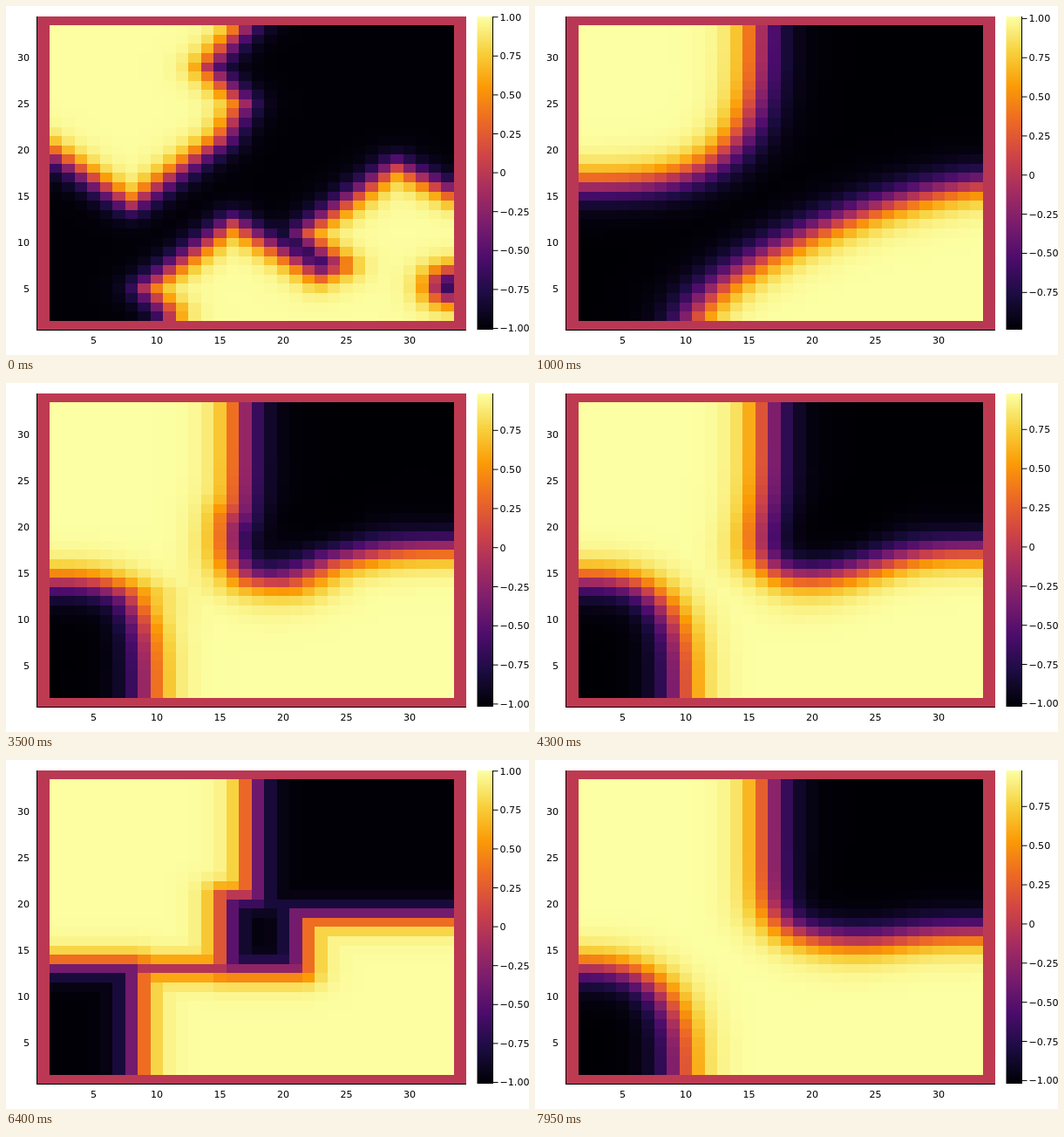
These frames come from a looping animation (600 by 400 pixels, 8000 ms). An HTML page with a canvas:

```html
<!DOCTYPE html>
<html lang="en">
<head>
<meta charset="utf-8">
<title>Phase field heatmap</title>
<style>
  html, body { margin: 0; width: 100%; height: 100%; overflow: hidden; background: #fff; }
  canvas, svg { position: absolute; left: 0; top: 0; width: 600px; height: 400px; }
  text { font: 11.1px "DejaVu Sans", sans-serif; fill: #000; }
  line { stroke: #000; stroke-width: 1; }
</style>
</head>
<body>
<canvas id="plot" width="600" height="400"></canvas>
<svg id="axes" viewBox="0 0 600 400"></svg>
<script>
const LOOP = 8000, STEP = 50, CELLS = 34;
const LEFT = 35.25, TOP = 11.6, CELL_W = 14.5, CELL_H = 10.58;
const LOW_EDGE = 1.5, HIGH_EDGE = 33.5;
const BAR = { x: 540.5, right: 558, top: 12, height: 359 };

const INFERNO = ['000004', '1b0c41', '4a0c6b', '781c6d', 'a52c60',
  'cf4446', 'ed6925', 'fb9b06', 'f7d13d', 'fcffa4']
  .map(h => [0, 2, 4].map(i => parseInt(h.slice(i, i + 2), 16)));

const mix = (a, b, p) => a + (b - a) * p;
const clamp = (v, a, b) => Math.max(a, Math.min(b, v));

function inferno(u) {
  const s = clamp(u, 0, 1) * (INFERNO.length - 1);
  const i = Math.min(Math.floor(s), INFERNO.length - 2);
  return `rgb(${INFERNO[i].map((c, k) => Math.round(mix(c, INFERNO[i + 1][k], s - i)))})`;
}

// Shapes are functions (x, y) => distance to the border, positive inside.
const union = (...shapes) => (x, y) => Math.max(...shapes.map(s => s(x, y)));
const outside = shape => (x, y) => -shape(x, y);

// Superellipse around a domain corner, optionally bulging towards one angle
function corner(cx, cy, a, b, power, bulge = 0, angle = 52, spread = 12) {
  const level = (x, y) => {
    const u = Math.abs(x - cx), v = Math.abs(y - cy);
    const turn = (Math.atan2(v, u) * 180 / Math.PI - angle) / spread;
    return ((u / a) ** power + (v / b) ** power) ** (1 / power) /
      (1 + bulge * Math.exp(-turn * turn));
  };
  const h = 0.01;
  return (x, y) => {
    const slope = Math.hypot(level(x + h, y) - level(x - h, y),
      level(x, y + h) - level(x, y - h)) / (2 * h);
    return (1 - level(x, y)) / slope;
  };
}
const topLeft = (...a) => corner(LOW_EDGE, HIGH_EDGE, ...a);
const topRight = (...a) => corner(HIGH_EDGE, HIGH_EDGE, ...a);
const bottomLeft = (...a) => corner(LOW_EDGE, LOW_EDGE, ...a);
const bottomRight = (...a) => corner(HIGH_EDGE, LOW_EDGE, ...a);

const disc = (cx, cy, r) => (x, y) => r - Math.hypot(x - cx, y - cy);

const box = (x0, y0, x1, y1) => (x, y) => {
  const dx = Math.max(x0 - x, x - x1), dy = Math.max(y0 - y, y - y1);
  return -Math.hypot(Math.max(dx, 0), Math.max(dy, 0)) - Math.min(Math.max(dx, dy), 0);
};

const polygon = (...points) => (x, y) => {
  let near = Infinity, odd = false;
  points.forEach(([ax, ay], i) => {
    const [bx, by] = points[(i + 1) % points.length];
    const dx = bx - ax, dy = by - ay;
    const t = clamp(((x - ax) * dx + (y - ay) * dy) / (dx * dx + dy * dy), 0, 1);
    near = Math.min(near, Math.hypot(x - ax - dx * t, y - ay - dy * t));
    if ((ay > y) !== (by > y) && x < ax + (y - ay) * dx / dy) odd = !odd;
  });
  return odd ? near : -near;
};

// Sample the bright phase on the grid, top row first
function state(shape, width, high, low) {
  const field = [];
  for (let y = CELLS - 1; y > 1; y--)
    for (let x = 2; x < CELLS; x++) field.push(shape(x, y));
  return { field, width, high, low };
}

const rough = shape => state(shape, 1.35, 1.004, -1.0085);
const darkBand = (...shapes) => state(union(...shapes), 1.95, 1.0134, -0.988);
const brightBand = (...shapes) => state(outside(union(...shapes)), 1.9, 0.98, -1.02);

const zigzagLeft = polygon([-20, 20.3], [1, 20.2], [8, 14.1], [15.2, 21.2],
  [16.8, 25], [14, 29], [18, 35], [18, 60], [-20, 60]);
const zigzagRight = polygon([11, -20], [11, 2.5], [9.1, 5], [16, 12.1], [22.8, 6.4],
  [24.6, 7.5], [21.6, 11], [28.9, 18.2], [33.5, 15.2], [60, 15.2], [60, -20]);
const hole = disc(33.4, 5.3, 1.5);
const zigzag = rough((x, y) => Math.min(union(zigzagLeft, zigzagRight)(x, y), -hole(x, y)));

const blocks = rough(outside(union(
  box(-20, -20, 8.5, 13.5),
  box(17.45, 18.5, 60, 60),
  box(15.3, 12.7, 21.5, 21),
  box(8, 12.95, 16, 13.05))));

const bandEarly = darkBand(topLeft(14.3, 17.2, 3.2), bottomRight(23, 14.7, 1.45));
const bandLate = darkBand(topLeft(15.1, 17.8, 2.2), bottomRight(21.4, 14.6, 1.85));
const lobe = brightBand(bottomLeft(8.1, 12.8, 3), topRight(17.1, 16.1, 8, 0.18, 53, 14));
const lobeLate = brightBand(bottomLeft(8.3, 12.2, 2.6), topRight(17, 17.3, 6));
const dip = brightBand(bottomLeft(7.5, 12.1, 3.5), topRight(16.4, 15.6, 8, 0.21, 52, 11));
const dipLate = brightBand(bottomLeft(8.1, 11.6, 2.7), topRight(17, 16.7, 8, 0.05, 61, 12));

const relax = p => (1 - Math.exp(-5 * p)) / (1 - Math.exp(-5));
const drift = p => p;
const SCHEDULE = [
  [0, 1000, zigzag, bandEarly, relax],
  [1000, 3200, bandEarly, bandLate, drift],
  [3200, 4300, blocks, lobe, relax],
  [4300, 6400, lobe, lobeLate, drift],
  [6400, 7000, blocks, dip, relax],
  [7000, 8000, dip, dipLate, drift]
];

const ctx = document.getElementById('plot').getContext('2d');
const axes = document.getElementById('axes');

function add(tag, attrs, label) {
  const node = document.createElementNS('http://www.w3.org/2000/svg', tag);
  for (const key in attrs) node.setAttribute(key, attrs[key]);
  if (label !== undefined) node.textContent = label;
  return axes.appendChild(node);
}

add('line', { x1: 35, x2: 528, y1: 371.5, y2: 371.5 });
add('line', { x1: 35.5, x2: 35.5, y1: 12, y2: 372 });
add('line', { x1: 558.5, x2: 558.5, y1: 12, y2: 371 });
for (let n = 5; n <= 30; n += 5) {
  add('text', { x: 28 + CELL_W * n, y: 387, 'text-anchor': 'middle' }, n);
  add('text', { x: 27, y: 380.6 - CELL_H * n, 'text-anchor': 'end' }, n);
}

const barTicks = [];
for (let v = -1; v <= 1; v += 0.25) {
  const label = v ? (v < 0 ? '\u2212' : '') + Math.abs(v).toFixed(2) : '0';
  barTicks.push({
    v,
    mark: add('line', { x1: 558, x2: 564.5 }),
    text: add('text', { x: 566.5 }, label)
  });
}

for (let y = 0; y < BAR.height; y++) {
  ctx.fillStyle = inferno(1 - y / (BAR.height - 1));
  ctx.fillRect(BAR.x, BAR.top + y, BAR.right - BAR.x, 1);
}

const edgeX = i => Math.round(LEFT + CELL_W * i);
const edgeY = i => Math.round(TOP + CELL_H * i);

function draw(time) {
  const [start, end, from, to, ease] = SCHEDULE.find(s => time < s[1]);
  const p = ease((time - start) / (end - start));
  const high = mix(from.high, to.high, p), low = mix(from.low, to.low, p);
  const width = mix(from.width, to.width, p);
  const span = high - low, shift = (high + low) / 2;
  const inner = CELLS - 2;

  ctx.fillStyle = inferno(-low / span);
  ctx.fillRect(35, 12, 493, 360);
  from.field.forEach((d, i) => {
    const col = 1 + i % inner, row = 1 + Math.floor(i / inner);
    const value = Math.tanh(mix(d, to.field[i], p) / width) + shift;
    const x = edgeX(col), y = edgeY(row);
    ctx.fillStyle = inferno((value - low) / span);
    ctx.fillRect(x, y, edgeX(col + 1) - x, edgeY(row + 1) - y);
  });

  for (const { v, mark, text } of barTicks) {
    const y = BAR.top + (high - v) / span * BAR.height;
    const visibility = v <= high && v >= low ? 'visible' : 'hidden';
    mark.setAttribute('y1', y);
    mark.setAttribute('y2', y);
    text.setAttribute('y', y + 4);
    mark.setAttribute('visibility', visibility);
    text.setAttribute('visibility', visibility);
  }
}

const begin = performance.now();
let shown = -1;
function tick() {
  const time = Math.floor((performance.now() - begin) % LOOP / STEP) * STEP;
  if (time !== shown) draw(shown = time);
  requestAnimationFrame(tick);
}
tick();
</script>
</body>
</html>
```
